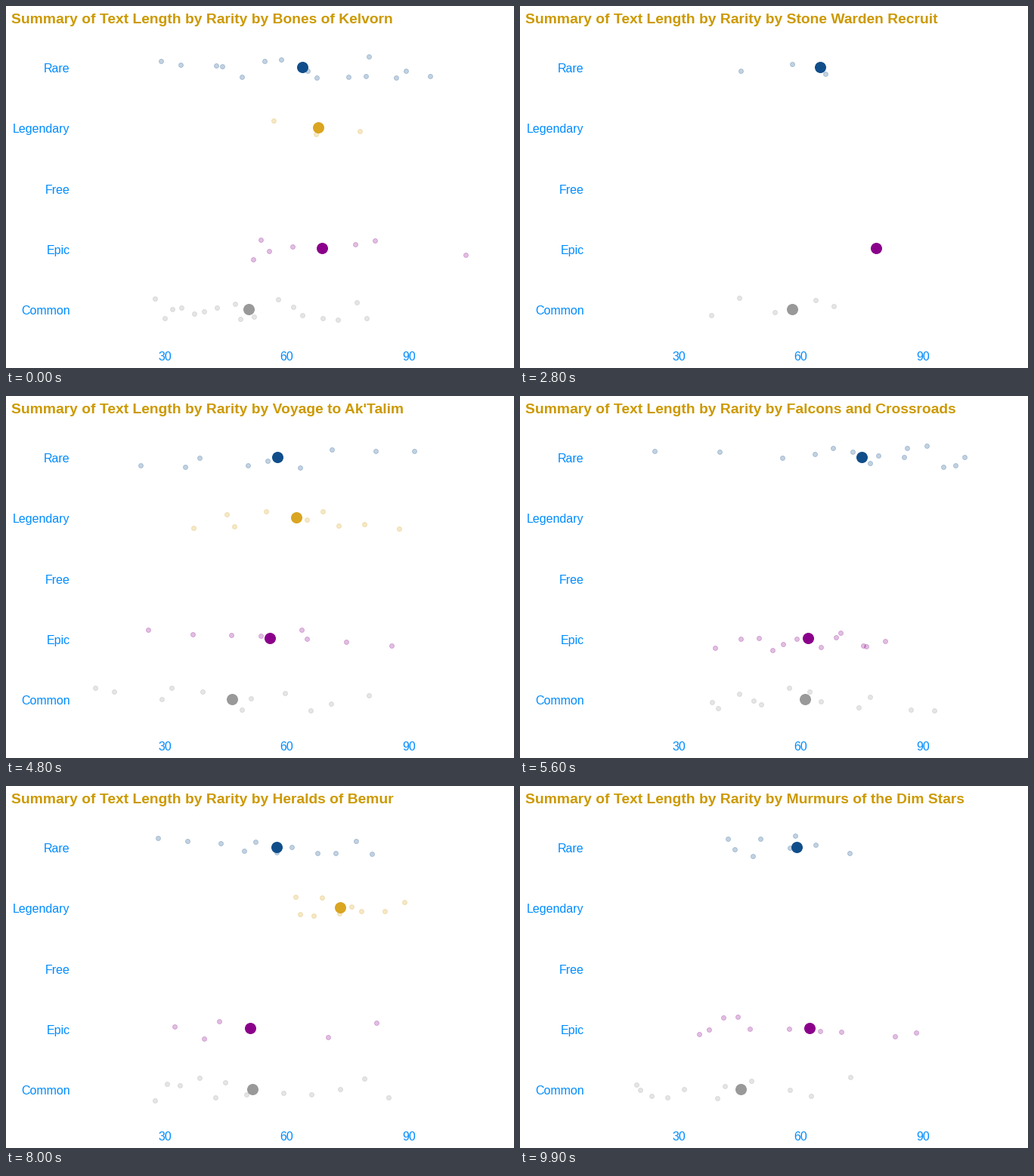
These frames come from a looping animation (672 by 480 pixels, 10 s). A matplotlib script:

```python
import matplotlib.pyplot as plt
import numpy as np
from matplotlib.animation import FuncAnimation
from matplotlib.colors import to_rgba
from matplotlib.patches import Circle

W, H, DPI = 672, 480, 72
FRAMES, STEP_MS = 100, 100
TITLE_COLOR, TEXT_COLOR = "#CC9900", "#008CFF"
COLORS = {"Rare": "#104E8B", "Legendary": "#DAA520", "Free": "#555555",
          "Epic": "#8B008B", "Common": "#999999"}
ROW_Y = {name: 81.3 + 80.2 * i for i, name in enumerate(COLORS)}

rng = np.random.default_rng(12)


def typical(n, lo, hi, legendary=False):
    """Rows for a set of common shape, filling lo..hi with about n dots each."""
    spans = {"Rare": (n, lo + 60, hi), "Epic": (n - 1, lo + 70, hi - 30),
             "Common": (n + 2, lo, hi - 60)}
    if legendary:
        spans["Legendary"] = (n, lo + 130, hi - 20)
    return {name: (k, a, (a + b) / 2, b) for name, (k, a, b) in spans.items()}


# Each row: number of dots, leftmost x, mean x, rightmost x.
SETS = [
    ("Bones of Kelvorn", dict(
        Rare=(15, 205, 392, 561), Legendary=(3, 354, 413, 468),
        Epic=(7, 327, 418, 608), Common=(17, 197, 321, 477))),
    ("Plain", dict(Free=(45, 118, 305, 500))),
    ("Coldbrook Mountain", typical(4, 235, 500)),
    ("Vintage", typical(26, 131, 555)),
    ("Plague of Vorrimoth", dict(Common=(4, 290, 350, 430))),
    ("Stone Warden Recruit", dict(
        Rare=(3, 292, 351, 404), Epic=(1, 457, 457, 457),
        Common=(5, 253, 336, 415))),
    ("Flight of Griffins", dict(
        Rare=(12, 300, 443, 560), Epic=(9, 350, 485, 594),
        Common=(13, 247, 384, 530))),
    ("Tormandel's Reckoning", typical(4, 222, 540)),
    ("Hermits vs Magpies", dict(
        Rare=(5, 305, 361, 430), Epic=(9, 254, 374, 485),
        Common=(7, 125, 298, 488))),
    ("Shelf of Honour", typical(3, 210, 564)),
    ("Voyage to Ak'Talim", typical(9, 118, 540, legendary=True)),
    ("Squires of the Sunken Palace", typical(11, 195, 560)),
    ("Falcons and Crossroads", dict(
        Rare=(14, 178, 452, 588), Epic=(12, 258, 381, 483),
        Common=(12, 254, 377, 548))),
    ("Guild of Cartographers", typical(4, 230, 520)),
    ("Grim Alleys of Copperwick", typical(8, 173, 560)),
    ("One Dusk in Belmorath", typical(3, 240, 595)),
    ("Gorvandek's Scuffle", dict(
        Rare=(9, 261, 374, 500), Epic=(11, 238, 431, 529),
        Common=(14, 139, 289, 383))),
    ("Dawn of Outlaws", typical(10, 215, 638)),
    ("Heralds of Bemur", dict(
        Rare=(11, 201, 358, 484), Legendary=(9, 383, 442, 527),
        Epic=(5, 223, 323, 490), Common=(12, 197, 326, 506))),
    ("The Clockwork Venture", typical(9, 175, 555, legendary=True)),
    ("The Golden Competition", typical(8, 143, 550)),
    ("The Gloomfen", typical(9, 190, 545)),
    ("Murmurs of the Dim Stars", dict(
        Rare=(8, 275, 340, 436), Epic=(10, 237, 348, 524),
        Common=(11, 154, 264, 437))),
]

# Frames per set; the last frame of each is halfway to the next set's means.
lengths = [4] + [5] * 8 + [4] * 14
timeline = [(s, k == n - 1) for s, n in enumerate(lengths) for k in range(n)]


def scatter(name, n, lo, mean, hi):
    """Jittered points from lo to hi, bunched so that they average to mean."""
    t = np.linspace(0, 1, n)
    t[1:-1] += rng.uniform(-0.5, 0.5, max(n - 2, 0)) / n
    power = (hi - lo) / max(mean - lo, 1) - 1
    x = lo + (hi - lo) * t ** power
    y = ROW_Y[name] + rng.uniform(-16, 16, n)
    return zip(np.round(x), np.floor(y))


plt.rcParams["font.family"] = ["Liberation Sans"]
fig = plt.figure(figsize=(W / DPI, H / DPI), dpi=DPI, facecolor="white")
ax = fig.add_axes([0, 0, 1, 1])
ax.set(xlim=(0, W), ylim=(H, 0))
ax.axis("off")

title = ax.text(7.3, 23, "", size=19.28, weight="bold", color=TITLE_COLOR)
for name, y in ROW_Y.items():
    ax.text(84.5, round(y + 7), name, size=16, color=TEXT_COLOR, ha="right")
for value in (30, 60, 90):
    ax.text(48.6 + 5.38 * value, 470, str(value), size=16, color=TEXT_COLOR,
            ha="center")


def circle(x, y, r, **style):
    return ax.add_patch(Circle((x + 0.5, y + 0.5), r, visible=False, **style))


def small_dots(rows):
    """Translucent dots whose rim overlaps the fill."""
    dots = []
    for name, spec in rows.items():
        tint = to_rgba(COLORS[name], 0.25)
        dots += [circle(x, y, 3, fc=tint, ec=tint, lw=1)
                 for x, y in scatter(name, *spec)]
    return dots


groups = [small_dots(rows) for _, rows in SETS]
means = [{name: spec[2] for name, spec in rows.items()} for _, rows in SETS]
mean_dots = {name: circle(0, int(y), 7.5, fc=COLORS[name], lw=0, zorder=3)
             for name, y in ROW_Y.items()}


def update(frame):
    current, moving = timeline[frame]
    title.set_text("Summary of Text Length by Rarity by " + SETS[current][0])
    for i, group in enumerate(groups):
        for dot in group:
            dot.set_visible(i == current)
    here, after = means[current], means[(current + 1) % len(SETS)]
    for name, dot in mean_dots.items():
        dot.set_visible(name in here)
        if name in here:
            x = here[name]
            if moving:
                x = (x + after.get(name, x)) / 2
            dot.set_center((round(x) + 0.5, int(ROW_Y[name]) + 0.5))
    return [title]


anim = FuncAnimation(fig, update, frames=FRAMES, interval=STEP_MS,
                     repeat=True, repeat_delay=0, blit=False)
plt.show()
```
